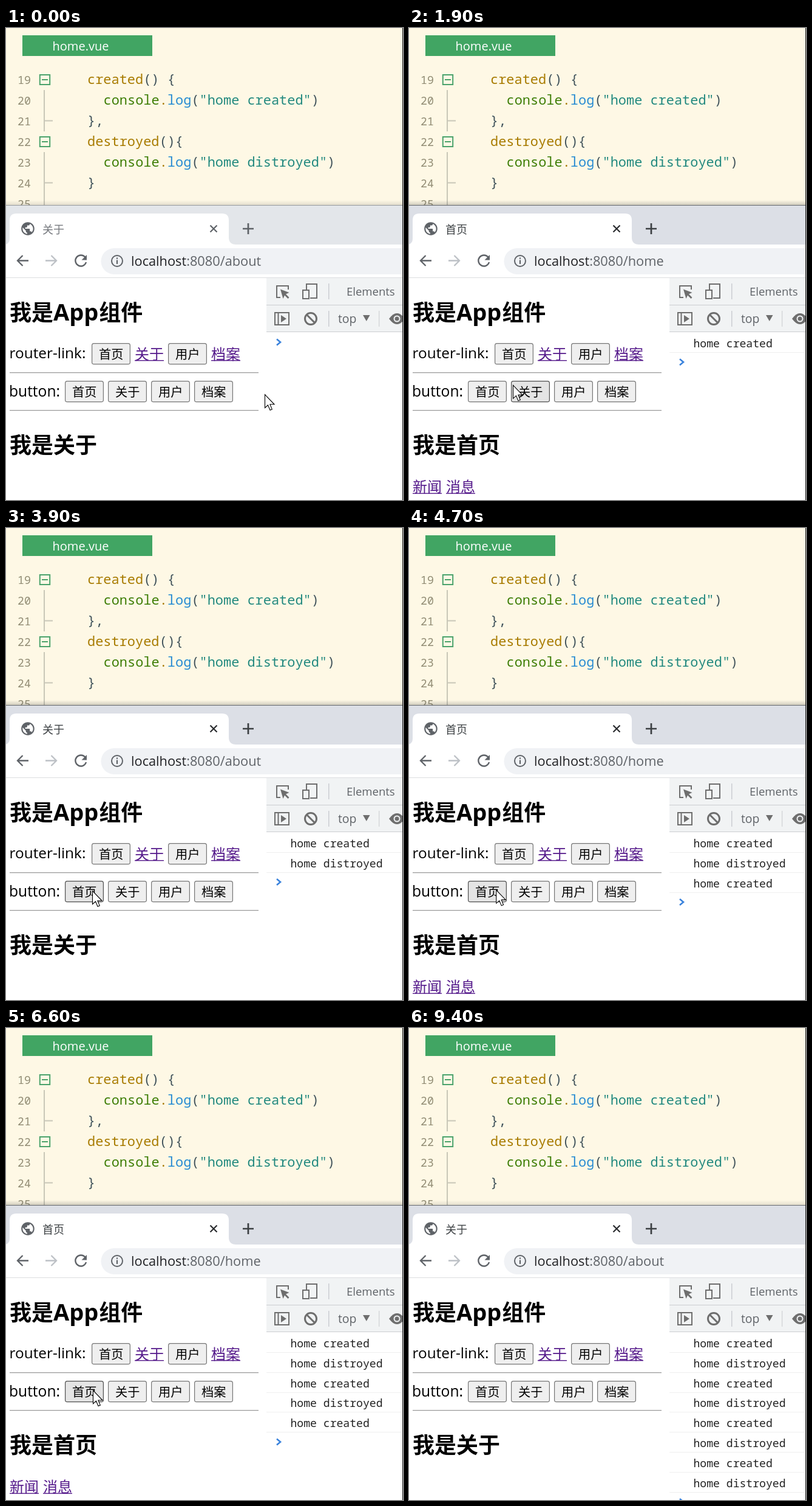
Recreate the animation shown at these times as an HTML page. Size 654x776 px, loop 9500 ms.

```html
<!DOCTYPE html>
<html lang="zh-CN">
<head>
<meta charset="utf-8">
<title>Router demo</title>
<style>
html, body { margin: 0; width: 100%; height: 100%; overflow: hidden; background: #fff; }
svg { display: block; width: 654px; height: 776px; }
text { white-space: pre; }
.ui { font-family: "Open Sans", "Noto Sans CJK SC", "Noto Sans CJK JP", "Noto Sans CJK", sans-serif; }
.mono { font-family: "Noto Sans Mono", "DejaVu Sans Mono", monospace; }
</style>
</head>
<body>
<svg id="stage" viewBox="0 0 654 776" xmlns="http://www.w3.org/2000/svg"></svg>
<script>
const stage = document.getElementById('stage');
const LOOP = 9500, STEP = 100, ROW = 32.8;
const GREY = '#5f6368', ICON = '#6e6e6e';
const NAMES = { about: '关于', home: '首页' };

const rect = (x, y, w, h, fill, extra = '') =>
  `<rect x="${x}" y="${y}" width="${w}" height="${h}" fill="${fill}" ${extra}/>`;
const path = (d, stroke, width, extra = '') =>
  `<path d="${d}" fill="none" stroke="${stroke}" stroke-width="${width}" ${extra}/>`;
const shape = (d, fill, extra = '') => `<path d="${d}" fill="${fill}" ${extra}/>`;
const text = (x, y, size, fill, str, cls = 'ui', extra = '') =>
  `<text class="${cls}" x="${x}" y="${y}" font-size="${size}" fill="${fill}" ${extra}>${str}</text>`;
const bold = (x, y, size, str, extra = '') =>
  text(x, y, size, '#000', str, 'ui', `font-weight="700" ${extra}`);
const span = (fill, str) => `<tspan fill="${fill}">${str}</tspan>`;

function editor() {
  const ink = '#41535b', amber = '#a87b00', green = '#3d7d05', blue = '#268bd2', teal = '#22897f';
  const call = str => span(green, 'console') + span(amber, '.') + span(blue, 'log') +
    span(ink, '(') + span(teal, `"${str}"`) + span(ink, ')');
  const lines = [
    [134, span(amber, 'created') + span(ink, '() {')],
    [160.5, call('home created')],
    [134, span(ink, '},')],
    [134, span(amber, 'destroyed') + span(ink, '(){')],
    [160.5, call('home distroyed')],
    [134, span(ink, '}')],
    [134, '']
  ];
  const rows = lines.map(([x, code], i) =>
    text(19, 92 + 34 * i, 18.3, '#918c74', 19 + i, 'mono') +
    text(x, 92 + 34 * i, 21.95, ink, code, 'mono')).join('');
  const folds = [85, 187].map((y, i) =>
    path(`M55.8 ${y - 8}h16.4v16h-16.4zM59 ${y}h10`, '#4ba36c', 2) +
    path(`M63 ${y + 17}V${i ? 291 : 170}M63 ${y + 67.5}h14`, '#c9c7b8', 2)).join('');
  return rect(0, 0, 654, 292, '#fef8e5') + rect(27, 12, 214, 34, '#41a563') +
    text(76.5, 37, 20, '#fff', 'home.vue') + rows + folds +
    rect(0, 283, 654, 9, 'url(#shade)', 'id="shadow"') + rect(0, 291, 654, 1, '#8f9297', 'id="edge"');
}

function browser() {
  const globe = shape('M12 2a10 10 0 1 0 0 20a10 10 0 0 0 0-20zm-1 17.900c-3.950-.5-7-3.850-7-7.900 0-.6.1-1.200.2-1.800L9 15v1' +
    'c0 1.100.9 2 2 2zm6.900-2.500c-.3-.8-1-1.400-1.900-1.400h-1v-3c0-.55-.45-1-1-1H8v-2h2c.55 0 1-.45 1-1V7h2' +
    'c1.100 0 2-.9 2-2v-.4c2.900 1.200 5 4.050 5 7.400 0 2.100-.8 4-2.100 5.400z', GREY, 'transform="translate(23 317) scale(1.08)"');
  return rect(0, 292, 654, 64, '#dee1e6', 'id="strip"') + rect(0, 356, 654, 54, '#fff') +
    shape('M0 356V355.500Q6 354 6 346V316Q6 305 17 305H356Q367 305 367 316V344Q367 356 379 356Z', '#fff') +
    globe + text(60, 338, 18, GREY, '', 'ui', 'id="title"') +
    path('M336.500 324.500l11 11m0-11l-11 11', '#3c4043', 2.2, 'id="close"') +
    path('M390 330h18m-9-9v18', '#3c4043', 2.700, 'id="plus"') +
    path('M37 382.500H19M27.500 374l-8.500 8.500 8.500 8.500', GREY, 2.300) +
    path('M65 382.500H83M74.500 374l8.500 8.500-8.500 8.500', '#bdc1c6', 2.300) +
    path('M130.500 377A9 9 0 1 0 132 385', GREY, 2.400) + shape('M133 373v8.500h-8.500z', GREY) +
    rect(156.5, 362, 530, 43, '#f0f2f5', 'rx="21.5"') +
    `<circle cx="183" cy="383" r="9" fill="none" stroke="${GREY}" stroke-width="2"/>` +
    path('M183 381.500v6.500M183 377.500v2.200', GREY, 2.200) +
    text(206, 391, 21.75, GREY, span('#202124', 'localhost') + ':8080/<tspan id="route"></tspan>') +
    rect(0, 410, 654, 1, '#dcdde0');
}

function link(x, y, str) {
  return text(x, y, 24, '#551a8b', str) + rect(x, y + 1.5, 48, 1.4, '#551a8b');
}

function button(x, y, str, id = '') {
  return rect(x + .6, y + .6, 62.8, 34, '#efefef', `rx="3.200" stroke="#767676" stroke-width="1.200" id="${id}"`) +
    text(x + 12, y + 26, 20.2, '#000', str);
}

function rule(y) {
  return rect(6, y, 410, 1, '#9a9a9a') + rect(6, y + 1, 410, 1, '#e6e6e6');
}

function page() {
  return rect(0, 411, 429, 365, '#fff') +
    bold(6, 480.5, 36, '我是') + bold(78, 480.5, 38, 'App') + bold(153.3, 480.5, 36, '组件') +
    text(5.5, 543.3, 24.4, '#000', 'router-link:') +
    button(141, 518, '首页') + link(212, 544.5, '关于') + button(267, 518, '用户') + link(338, 544.5, '档案') +
    rule(566) + text(5, 605.5, 24.6, '#000', 'button:') +
    button(97, 580, '首页', 'btnHome') + button(168, 580, '关于', 'btnAbout') +
    button(239, 580, '用户') + button(310, 580, '档案') + rule(628) +
    bold(6, 699, 36, '', 'id="heading"') +
    `<g id="links">${link(6, 763, '新闻')}${link(61, 763, '消息')}</g>`;
}

function devtools() {
  const logs = Array.from({ length: 8 }, (_, i) => {
    const y = 525 + ROW * i;
    return `<g class="log">${text(468.5, y, 18.1, '#222', i % 2 ? 'home distroyed' : 'home created', 'mono')}` +
      rect(429, Math.round(y + 8), 222, 1, '#efefef') + '</g>';
  }).join('');
  return rect(429, 411, 225, 365, '#fff') + rect(429, 411, 225, 88, '#f1f3f4') +
    rect(429, 455, 225, 1, '#cbcdd1') + rect(429, 499, 225, 1, '#cbcdd1') +
    path('M452 443H446V424H465V430', ICON, 2) + shape('M452 429.500l14.500 5.500-5.500 2.500 5.500 5.500-2 2-5.500-5.500-2.500 5.500z', ICON) +
    path('M495 430V421H512V444H501', ICON, 2) + path('M489 431h10v14h-10z', ICON, 2) +
    rect(531, 420, 1.5, 26, '#cbcdd1') + text(561, 440, 18.5, GREY, 'Elements') +
    path('M443 468h23v20h-23zM448.500 468v20', ICON, 2) + shape('M453 472l9 6-9 6z', ICON) +
    `<circle cx="502" cy="478" r="9.500" fill="none" stroke="${ICON}" stroke-width="3"/>` +
    path('M495.500 471.500l13 13', ICON, 3) +
    rect(531, 465, 1.5, 26, '#cbcdd1') + text(547, 485, 19.4, GREY, 'top') +
    shape('M588 472h11.500l-5.750 10z', ICON) + rect(614, 465, 1.2, 26, '#d0d2d5') +
    shape('M631 478Q644 460 657 478Q644 496 631 478z', ICON) +
    '<circle cx="644" cy="478" r="5.500" fill="#f1f3f4"/>' + `<circle cx="644" cy="478" r="3.500" fill="${ICON}"/>` +
    logs + path('M446 511.500l6 5-6 5', '#3b83dc', 2.600, 'id="prompt"');
}

stage.innerHTML =
  '<defs><linearGradient id="shade" x1="0" y1="0" x2="0" y2="1">' +
  '<stop offset="0" stop-color="#555" stop-opacity="0"/><stop offset="1" stop-color="#555" stop-opacity=".3"/>' +
  '</linearGradient></defs>' +
  editor() + browser() + page() + devtools() + rect(653, 0, 1, 776, '#1c1c1c') +
  shape('M.5 .7V22.500L5.500 18 9 26.300 12.300 24.900 8.900 16.800H16z', '#fff',
    'id="cursor" stroke="#000" stroke-width="1.100"');

const el = {};
stage.querySelectorAll('[id]').forEach(n => { if (n.id) el[n.id] = n; });
const logRows = stage.querySelectorAll('.log');

// Pointer stops: time, x, y
const stops = [
  [0, 426, 602], [700, 118, 591], [1800, 118, 591], [2250, 538, 556], [2400, 538, 556],
  [2800, 208, 604], [3500, 208, 604], [3900, 142, 596], [4100, 132, 594], [4500, 132, 594],
  [5200, 189, 597], [5900, 189, 597], [6250, 135, 595], [6500, 135, 595], [6900, 186, 596],
  [7000, 186, 596], [7250, 140, 594], [7400, 140, 594], [7600, 174, 594], [7800, 188, 596], [LOOP, 188, 596]
];
// Each click toggles between the two routes and logs one line.
const clicks = [1100, 3000, 4400, 5300, 6300, 7000, 7300, 8000];

function pointer(t) {
  const i = Math.max(1, stops.findIndex(s => s[0] >= t));
  const [t0, x0, y0] = stops[i - 1], [t1, x1, y1] = stops[i];
  const p = (t - t0) / (t1 - t0), k = p * p * (3 - 2 * p);
  return [x0 + (x1 - x0) * k, y0 + (y1 - y0) * k];
}

const clicked = t => clicks.filter(c => c <= t).length;
const routeAt = t => clicked(t) % 2 ? 'home' : 'about';
const set = (node, attrs) => { for (const k in attrs) node.setAttribute(k, attrs[k]); };

function hover(node, left, x, y, shown) {
  const on = shown && x >= left && x <= left + 64 && y >= 580 && y <= 615;
  set(node, { fill: on ? '#e4e4e4' : '#efefef', stroke: on ? '#4f4f4f' : '#767676' });
}

function draw(t) {
  const [x, y] = pointer(t), count = clicked(t), route = routeAt(t);
  const active = t >= clicks[0], shown = t < 9200;
  set(el.cursor, { transform: `translate(${x.toFixed(1)} ${y.toFixed(1)})`, visibility: shown ? 'visible' : 'hidden' });
  hover(el.btnHome, 97, x, y, shown);
  hover(el.btnAbout, 168, x, y, shown);

  set(el.strip, { fill: active ? '#dcdfe6' : '#e3e6ea' });
  set(el.shadow, { opacity: active && t < 9400 ? 1 : .6 });
  set(el.edge, { fill: active ? '#66696e' : '#96999d' });
  set(el.title, { fill: active ? '#3c4043' : '#75787d' });
  set(el.close, { stroke: active ? '#2b2d30' : GREY });
  set(el.plus, { stroke: active ? '#3c4043' : GREY });

  el.title.textContent = NAMES[routeAt(t - 250)];
  el.route.textContent = route;
  el.heading.textContent = '我是' + NAMES[route];
  set(el.links, { visibility: route === 'home' ? 'visible' : 'hidden' });
  logRows.forEach((row, i) => set(row, { visibility: i < count ? 'visible' : 'hidden' }));
  set(el.prompt, { transform: `translate(0 ${ROW * count})` });
}

const start = performance.now();
function tick() {
  const t = (performance.now() - start) % LOOP;
  draw(Math.floor(t / STEP) * STEP);
  requestAnimationFrame(tick);
}
tick();
</script>
</body>
</html>
```
